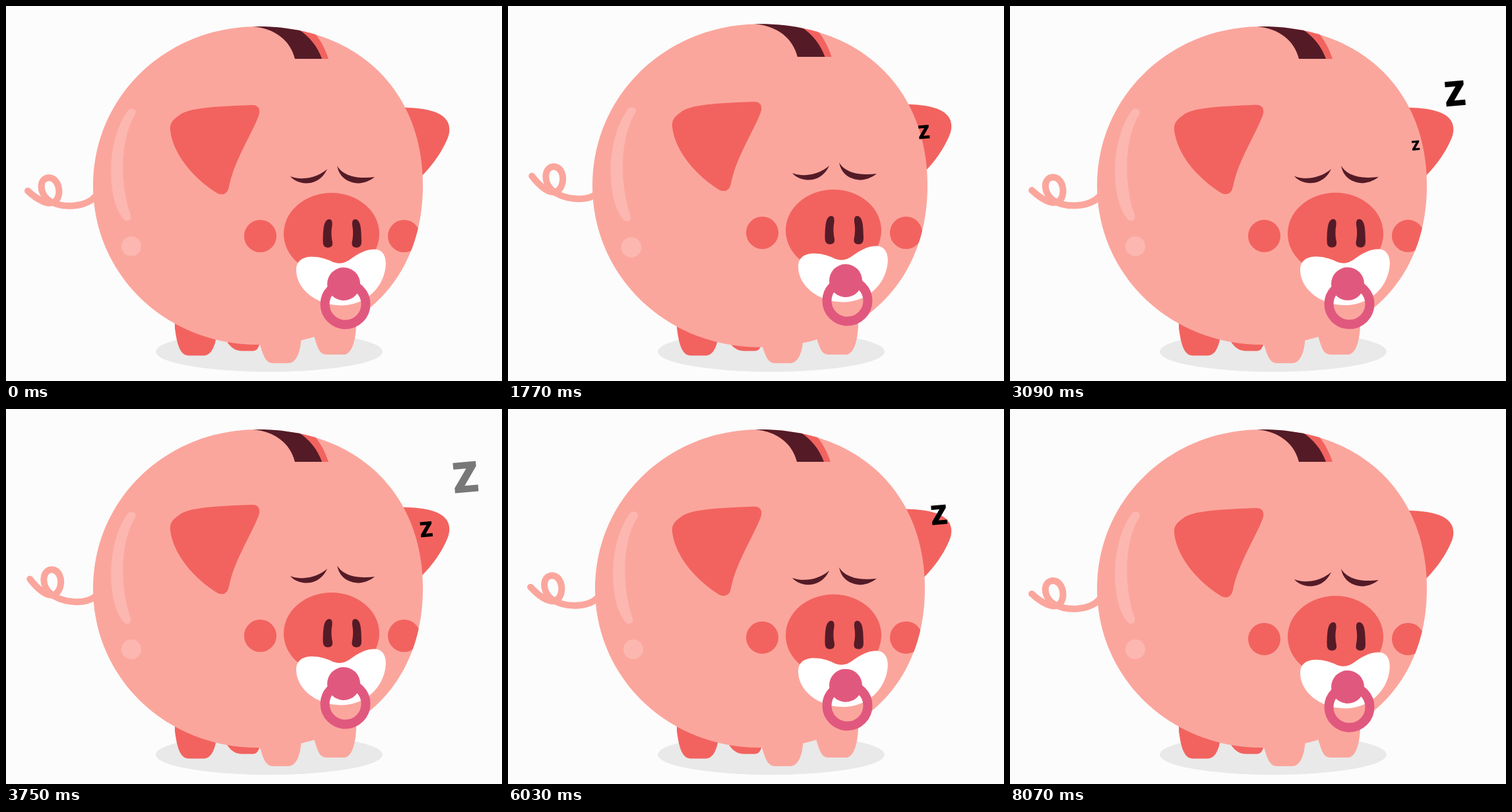
Recreate the animation shown at these times as an HTML page. Size 752x568 px, loop 8.1 s.

```html
<!DOCTYPE html>
<html lang="en">
<head>
<meta charset="utf-8">
<title>Sleeping piggy bank</title>
<style>
  html, body { margin: 0; width: 100%; height: 100%; overflow: hidden; background: #fcfcfc; }
  svg { display: block; width: 100vw; height: 100vh; }
  .skin { fill: #fba69d; }
  .red { fill: #f2635f; }
  .dark { fill: #541b27; }
  .shine { fill: #fcb7b1; }
  text { font: 800 64px "Open Sans", "Noto Sans", sans-serif; text-anchor: middle; }
</style>
</head>
<body>
<svg viewBox="0 0 752 568">
  <defs>
    <clipPath id="bodyClip">
      <path class="body" d="M382 31C532 31 632 127 632 272S532 513 382 513C242 513 132 407 132 272S242 31 382 31Z"/>
    </clipPath>
  </defs>

  <ellipse cx="399" cy="523.5" rx="172" ry="30.5" fill="#e9e9e9"/>
  <g class="red">
    <path d="M256 465V488C259 510 263 529.5 277 529.5H300C311 529.5 317 515 319 500V465Z"/>
    <path d="M330 500C338 515 345 522.5 358 522.5H374C382 522.5 385 515 386 500Z"/>
  </g>
  <path id="tail" d="M33 280C48 294 64 302 73 297C86 289 81 260 65 260C49 261 50 285 67 296C85 306 120 306 136 288"
    fill="none" stroke="#fba69d" stroke-width="10" stroke-linecap="round"/>
  <path class="face red" d="M590 154C622 153 648 157 661 166C674 175 675 190 668 204C660 222 647 241 630 258H590Z"/>

  <g clip-path="url(#bodyClip)">
    <g class="body">
      <path class="skin" d="M122 21H642V523H122Z"/>
      <path class="red" d="M440 25H452C470 40 481 57 489 80H470Z"/>
      <path class="dark" d="M374 31C408 34 431 52 438 80H479C472 61 461 47 443 35L430 20H374Z"/>
      <path class="shine" d="M186 157C190 153 200 157 196 164C173 200 172 270 189 317C191 326 181 328 177 321C152 290 152 200 186 157Z"/>
      <circle class="shine" cx="190" cy="364" r="15"/>
    </g>
    <circle class="face red" cx="603.5" cy="348.5" r="24.5"/>
  </g>

  <g class="skin">
    <path d="M385 480V513C390 528 393 541 405 541H428C440 541 446 525 447.500 505V480Z"/>
    <path d="M467 465V500C472 515 474 528 486 528H512C524 528 530 508 531 484V468Z"/>
  </g>

  <g class="face">
    <path class="red" d="M262 166C275 154 320 152 371 150Q386 149 384 163C378 185 345 235 338 274Q335 289 321 284C285 262 253 225 249 188C248 178 253 172 262 166Z"/>
    <circle class="red" cx="385.500" cy="348.5" r="24.5"/>
    <g class="dark">
      <path d="M431 258C445 264 470 262 487 247C480 262 468 268.500 455 268.500C444 268 436 264 431 258Z"/>
      <path d="M502 242C510 256 530 263 559 259C550 266 541 268.500 533 268.500C516 267 505 258 502 242Z"/>
    </g>
    <ellipse class="red" cx="493.5" cy="345" rx="72.5" ry="62"/>
    <g class="dark">
      <path id="nostril" d="M490 323Q495.500 323 494.500 332Q492 345 495 358Q496 366 487.500 366Q480 366 480.500 355C481 340 481 324 490 323Z"/>
      <use href="#nostril" transform="translate(1019.5) scale(-1 1)"/>
    </g>
    <path fill="#fff" d="M440 400C440 373 475 378 492 386Q507 394 520 385C535 374 546 368.500 559 368.500C574 369 577 384 575.500 395C572 427 545 453.500 508 453.500C468 453 440 427 440 400Z"/>
    <g fill="#e1587e">
      <circle cx="514.500" cy="451.5" r="31" fill="none" stroke="#e1587e" stroke-width="14"/>
      <circle cx="512" cy="421" r="25"/>
    </g>
  </g>

  <text y="23">Z</text>
  <text y="23">Z</text>
  <text y="23">Z</text>
</svg>
<script>
  const LOOP = 8100, BREATH = 2700;
  const all = s => document.querySelectorAll(s);
  const faces = all('.face'), bodies = all('.body'), letters = all('text');
  const tail = document.getElementById('tail');

  const clamp = x => Math.min(1, Math.max(0, x));
  const ease = (t, from, to) => (1 - Math.cos(Math.PI * clamp((t - from) / (to - from)))) / 2;
  const move = (list, value) => list.forEach(el => el.setAttribute('transform', value));

  function draw(t) {
    const b = t % BREATH;
    const fall = ease(b, 2000, 2700);
    const lift = ease(b, 300, 1000) - fall;
    move(faces, `translate(0 ${-5 * lift})`);
    tail.setAttribute('transform', `translate(0 ${-5 * lift}) rotate(${10 * lift} 134 290)`);

    // Only the first breath swells the body.
    const swell = t < BREATH ? ease(b, 300, 1700) - fall : 0;
    move(bodies, `translate(382 272) scale(${1 + 0.016 * swell}) translate(-382 -272)`);

    letters.forEach((z, i) => {
      const age = t - 165 - 1785 * i;
      const dx = Math.max(0, age / 30);
      z.setAttribute('transform',
        `translate(${577 + dx} ${261.5 - 1.325 * dx}) rotate(-5) scale(${dx / 119})`);
      z.setAttribute('opacity', age > 0 ? 1 - clamp((age - 3300) / 600) : 0);
    });
  }

  const start = performance.now();
  function tick() {
    draw((performance.now() - start) % LOOP);
    requestAnimationFrame(tick);
  }
  tick();
</script>
</body>
</html>
```
